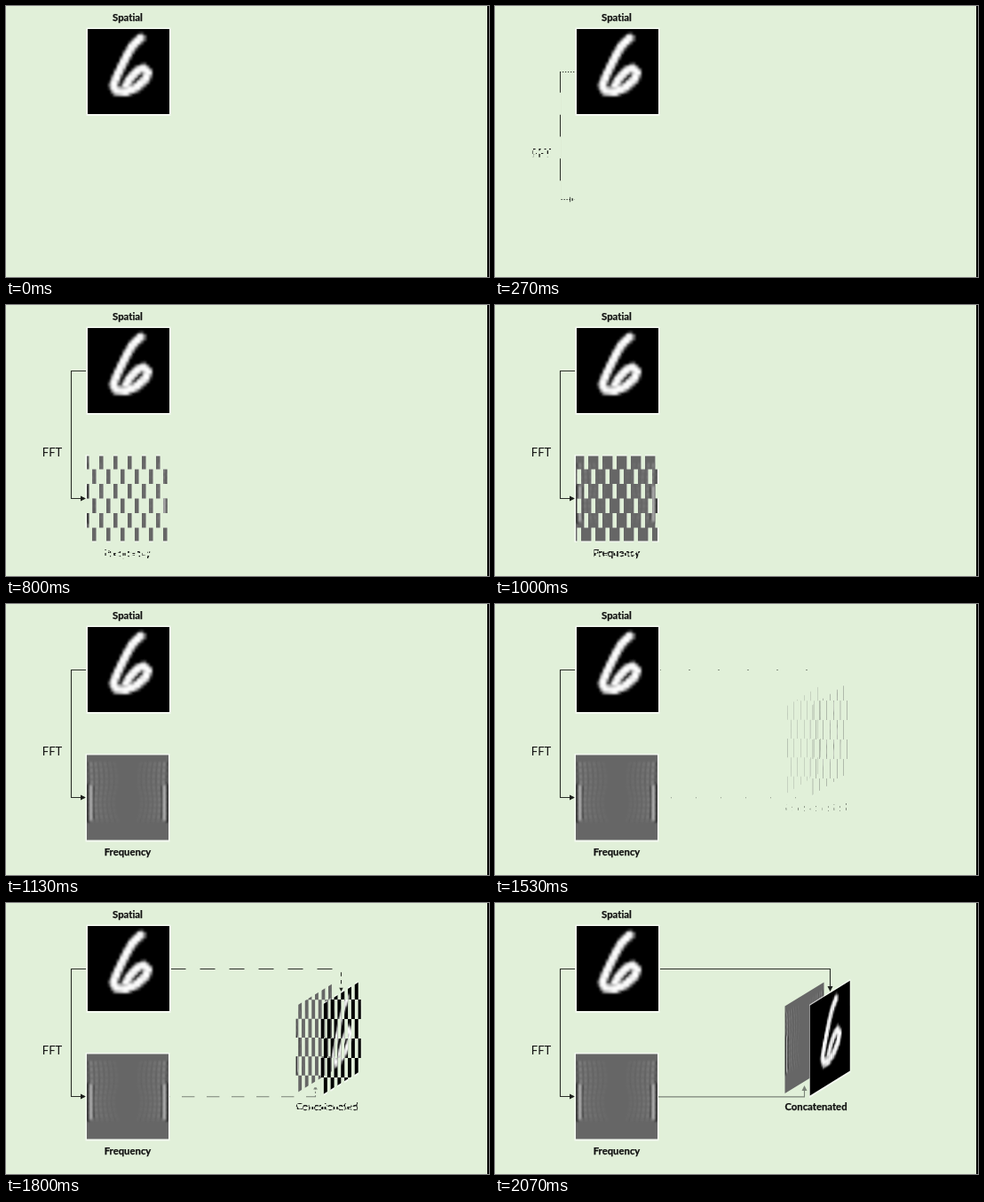
An HTML page that plays this animation: 544 by 306 pixels, repeating every 2540 ms.

```html
<!DOCTYPE html>
<html lang="en">
<head>
<meta charset="utf-8">
<title>Spatial and frequency input</title>
<style>
  html, body { margin: 0; width: 100%; height: 100%; overflow: hidden; background: #e1f0d9; }
  svg { display: block; width: 100%; height: 100%; }
  text { font-family: Lato, Inter, sans-serif; font-variant-ligatures: none; text-anchor: middle; fill: #111; }
  .label { font-size: 11.3px; font-weight: 700; stroke: #111; stroke-width: .25; }
  .wire { fill: none; stroke: #2b2f29; stroke-width: 1.1; }
  .head { fill: #1c1f1b; }
  .soft .wire { stroke: #7b8378; }
  .soft .head { fill: #7b8378; }
</style>
</head>
<body>
<svg viewBox="0 0 544 306">
  <defs>
    <filter id="blur" x="-5%" y="-5%" width="110%" height="110%"><feGaussianBlur stdDeviation="0.8"/></filter>
    <clipPath id="tile"><rect width="92" height="96"/></clipPath>
    <rect id="border" x="-1.5" y="-1.5" width="95" height="99.5" fill="#fff" opacity=".65"/>
    <g id="digit">
      <use href="#border"/>
      <rect width="92" height="96"/>
      <g id="pixels" filter="url(#blur)"/>
    </g>
    <g id="spectrum">
      <rect width="92" height="96" fill="#666"/>
      <g clip-path="url(#tile)"><g id="fringes" fill="none" filter="url(#blur)"/></g>
    </g>
  </defs>

  <rect width="544" height="306" fill="#e1f0d9"/>
  <rect x="542" width="2" height="306"/>
  <text class="label" x="137" y="17">Spatial</text>
  <use href="#digit" x="92" y="26"/>

  <g data-phase="0" data-box="34 156 36 22"><text x="52" y="171" font-size="13">FFT</text></g>
  <g data-phase="0" data-box="73 73 18 149">
    <path class="wire" d="M90 74.5H73.5V218.5H85"/>
    <path class="head" d="M90 218.5l-6-3v6z"/>
  </g>

  <g data-phase="1" data-box="89 169 96 99">
    <use href="#border" x="91" y="170.5"/>
    <use href="#spectrum" x="91" y="170.5"/>
  </g>
  <g data-phase="1" data-box="104 271 66 18"><text class="label" x="137" y="284">Frequency</text></g>

  <g data-phase="2" data-box="185.5 74 198 26">
    <path class="wire" d="M186 74.5H377.5V95"/>
    <path class="head" d="M377.5 100l-3-6h6z"/>
  </g>
  <g data-phase="2" data-box="325.5 88 45 128"><use href="#spectrum" transform="matrix(.478 -.293 0 1.025 326.5 116.5)"/></g>
  <g data-phase="2" data-box="354 87 46.5 132"><use href="#digit" transform="matrix(.49 -.304 0 1.06 354.7 115.8)"/></g>
  <g class="soft" data-phase="2" data-box="184 206 168 13.5">
    <path class="wire" d="M184 218.9H348.5V210"/>
    <path class="head" d="M348.5 206l-3 6h6z"/>
  </g>
  <g data-phase="2" data-box="321 221 81 18"><text class="label" x="361.5" y="234">Concatenated</text></g>
</svg>

<script>
const NS = 'http://www.w3.org/2000/svg';
const LOOP = 2540, STEP = 66.5, CELLS = 6;
const phases = [
  { start: 130, reveal: k => k / 7 },
  { start: 730, reveal: k => k / 7 },
  { start: 1530, reveal: k => (k - 0.75) / 8.25 }
];

function add(parent, tag, attrs) {
  const el = document.createElementNS(NS, tag);
  for (const name in attrs) el.setAttribute(name, attrs[name]);
  parent.appendChild(el);
  return el;
}

// Distance from a point to a segment.
function distance(x, y, [ax, ay], [bx, by]) {
  const dx = bx - ax, dy = by - ay;
  const s = Math.max(0, Math.min(1, ((x - ax) * dx + (y - ay) * dy) / (dx * dx + dy * dy)));
  return Math.hypot(x - ax - s * dx, y - ay - s * dy);
}

// Handwritten six, sampled on a 28 x 28 grid.
function drawDigit() {
  const pen = [[60, 10], [52, 17], [45, 28], [38, 42], [32, 55], [29, 64], [32, 70], [43, 71],
    [55, 66], [65, 57], [68, 49], [63, 44], [56, 47], [49, 54], [43, 64]];
  const w = 92 / 28, h = 96 / 28, host = document.getElementById('pixels');
  for (let row = 0; row < 28; row++) {
    for (let col = 0; col < 28; col++) {
      const x = (col + 0.5) * w, y = (row + 0.5) * h;
      let d = 99;
      for (let i = 1; i < pen.length; i++) d = Math.min(d, distance(x, y, pen[i - 1], pen[i]));
      const light = Math.round(255 * Math.max(0, Math.min(1, (5.8 - d) / 3)));
      if (light) add(host, 'rect', {
        x: col * w, y: row * h, width: w + 0.4, height: h + 0.4, fill: `rgb(${light},${light},${light})`
      });
    }
  }
}

// Mirrored interference fringes, strongest at the outer edges.
function drawSpectrum() {
  const host = document.getElementById('fringes');
  const line = (d, stroke, width, opacity, dash = 'none') => add(host, 'path', {
    d, stroke, 'stroke-width': width, 'stroke-opacity': opacity, 'stroke-dasharray': dash
  });
  const shade = i => i % 2 ? '#ddd' : '#0c0c0c';

  for (const side of [1, -1]) {
    const px = x => side > 0 ? x : 92 - x;
    for (let i = 0; i < 12; i++) {
      const x = 3 + i * 2.6;
      line(`M${px(x - 1)} 8Q${px(x + i * 0.4)} 26 ${px(x)} 42T${px(x + i * 0.3)} 75`,
        shade(i), 1.5, 0.5 * Math.exp(-i / 6), '5 1.6');
    }
    for (let i = 0; i < 3; i++) {
      line(`M${px(1.8 + i * 2.7)} ${33 + i}V${76 - i * 2}`, shade(i), 2.3, 0.95 - i * 0.2);
    }
  }
}

const parts = [...document.querySelectorAll('[data-phase]')].map((el, i) => {
  const clip = add(document.querySelector('defs'), 'clipPath', { id: 'clip' + i });
  return {
    el, url: `url(#clip${i})`, mask: add(clip, 'path', {}),
    box: el.dataset.box.split(' ').map(Number), phase: phases[el.dataset.phase]
  };
});

// Checkerboard wipe: odd rows run half a cell later and wrap at the left edge.
function checker([x, y, w, h], p) {
  const cw = w / CELLS, ch = h / CELLS;
  let d = '';
  for (let row = 0; row < CELLS; row++) {
    const shift = row % 2 ? 0.5 : 0;
    for (let col = -1; col < CELLS; col++) {
      const from = Math.max(0, col + shift), to = Math.min(CELLS, col + shift + p);
      if (to > from) d += `M${x + from * cw} ${y + row * ch}h${(to - from) * cw}v${ch}h${(from - to) * cw}z`;
    }
  }
  return d;
}

function render(t) {
  for (const { el, url, mask, box, phase } of parts) {
    const k = Math.floor((t - phase.start) / STEP) + 1;
    const p = k < 1 ? 0 : Math.min(1, phase.reveal(k));
    el.style.display = p ? '' : 'none';
    if (p === 1) el.removeAttribute('clip-path');
    else if (p) {
      mask.setAttribute('d', checker(box, p));
      el.setAttribute('clip-path', url);
    }
  }
}

drawDigit();
drawSpectrum();
render(0);
const origin = performance.now();
(function tick() {
  render((performance.now() - origin) % LOOP);
  requestAnimationFrame(tick);
})();
</script>
</body>
</html>
```
